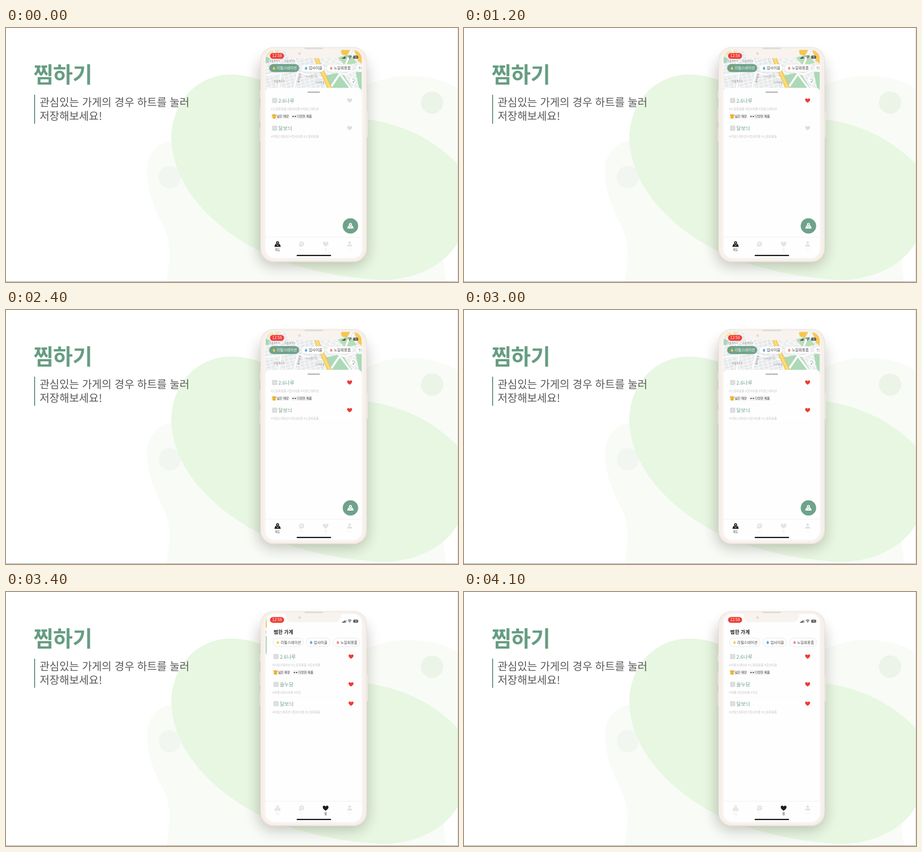
Animation, 853 px wide and 480 px high, one loop 4200 ms. Source, as an HTML page:

```html
<!DOCTYPE html>
<html lang="ko">
<head>
<meta charset="utf-8">
<title>찜하기</title>
<style>
html, body { margin: 0; width: 100%; height: 100%; overflow: hidden; background: #fff; }
svg { display: block; width: 853px; height: 480px; }
text { font-family: "Noto Sans CJK KR", "Noto Sans CJK", "Noto Sans", sans-serif; }
</style>
</head>
<body>
<svg id="stage" viewBox="0 0 853 480" xmlns="http://www.w3.org/2000/svg"></svg>
<script>
const GREEN = '#6fa28b', RED = '#f03b34', GRAY = '#dcdfdf';
const LOOP = 4200, PAGE_W = 182;
const LIKE_1 = 800, LIKE_2 = 1600, TAB = 3060, SLIDE = 3048, SLIDE_MS = 380, LIST = 3290;

const rect = (x, y, w, h, r, fill, more = '') =>
  `<rect x="${x}" y="${y}" width="${w}" height="${h}" rx="${r}" fill="${fill}" ${more}/>`;
const circle = (x, y, r, fill, more = '') =>
  `<circle cx="${x}" cy="${y}" r="${r}" fill="${fill}" ${more}/>`;
const path = (d, fill, more = '') => `<path d="${d}" fill="${fill}" ${more}/>`;
const line = (d, color, w, more = '') =>
  path(d, 'none', `stroke="${color}" stroke-width="${w}" ${more}`);
const text = (x, y, size, fill, s, weight = 400, more = '') =>
  `<text x="${x}" y="${y}" font-size="${size}" fill="${fill}" font-weight="${weight}" ${more}>${s}</text>`;
const at = (x, y, s, more = '') => `<g transform="translate(${x} ${y})" ${more}>${s}</g>`;

const HEART = 'M0 4.3C-2 2.5-4.7 .8-4.7-1.6C-4.7-4.4-1.4-4.9 0-2.5C1.4-4.9 4.7-4.4 4.7-1.6C4.7 .8 2 2.5 0 4.3Z';
const heart = (x, y, fill, id = '') => at(x, y, path(HEART, fill, id && `id="${id}"`));

const drop = (x, y, c) =>
  at(x, y, path('M0-3.1C1-1.6 2.2-.5 2.2 .9A2.2 2.2 0 0 1-2.2 .9C-2.2-.5-1-1.6 0-3.1Z', c) +
    circle(0, 1.1, .9, '#fff', 'opacity=".4"'));

const clover = (x, y) =>
  at(x, y, [[-2, -2], [2, -2], [-2, 2], [2, 2]].map(p => circle(...p, 3.1, '#dadddb')).join('') +
    line('M-3-3L3 3M3-3L-3 3', '#eceeed', .5));

function chip(x, y, w, h, label, color, on) {
  const off = h > 15 ? 14.2 : 13.7;
  return rect(x, y, w, h, h / 2, on ? GREEN : '#fff', `stroke="${on ? GREEN : '#dcdedd'}" stroke-width=".7"`) +
    drop(x + off - 5, y + h / 2, color) +
    text(x + off, y + h / 2 + 2.6, 6.95, on ? '#fff' : '#444', label);
}

const face = (x, y) => at(x, y,
  circle(0, .9, 3.5, '#f9c93d') +
  path('M-3.6-1L-4-4.2L-1.9-2.7L0-4.8L1.9-2.7L4-4.2L3.6-1Z', '#f2a52c') +
  circle(-1.2, .7, .5, '#6b4a1c') + circle(1.2, .7, .5, '#6b4a1c') +
  line('M-1.3 2.3Q0 3.3 1.3 2.3', '#6b4a1c', .5));
const eyes = (x, y) => [-2.1, 2.1].map(d =>
  `<ellipse cx="${x + d}" cy="${y}" rx="1.8" ry="2.2" fill="#fff" stroke="#ddd" stroke-width=".3"/>` +
  circle(x + d - .2, y + .2, 1.15, '#222')).join('');

const badges = y =>
  rect(500, y - 5.3, 35, 10.6, 3, '#f6f6f6') + face(506, y) + text(511, y + 2, 5.65, '#333', '넓은 매장') +
  rect(538, y - 5.3, 40.5, 10.6, 3, '#f6f6f6') + eyes(544, y) + text(549, y + 2, 5.75, '#333', '다양한 제품');

const shop = (y, name, tags, fill, id) =>
  clover(507, y) + text(514, y + 3.5, 9.4, GREEN, name, 500) +
  heart(648.5, y, fill, id) + text(500, y + 17.6, 5.65, '#c0c2c1', tags);

const pin = (fill, hole) =>
  path('M-6 5L-4.4-.2H-2.6Q-1.4 2 0 3.4Q1.4 2 2.6-.2H4.4L6 5Z', fill) +
  path('M0 2.3C-1.4 .7-2.9-.8-2.9-2.6A2.9 2.9 0 0 1 2.9-2.6C2.9-.8 1.4 .7 0 2.3Z', fill) +
  circle(0, -2.6, 1.1, hole);

function cityMap() {
  const label = (x, y, s, more) => text(x, y, 5, '#666', s, 400,
    `stroke="#fff" stroke-width="1" paint-order="stroke" ${more || ''}`);
  const road = d => line(d, '#d9dcdf', 4.2) + line(d, '#fff', 3.2);
  return `<g clip-path="url(#mapClip)">` +
    rect(490, 41, 182, 80, 0, '#e9ebed') +
    rect(490, 41, 182, 80, 0, 'url(#blocks)') +
    path('M583 41H672V121H614Z', '#eef0ee') +
    path('M583 41H672V121H614Z', 'url(#blocks2)') +
    path('M490 54L499 58L495 66L490 66Z', '#a9d7b4') +
    path('M490 41H516L513 47L490 52Z', '#f4e7b4') +
    path('M603 90L634 83L653 113H612Z', '#acd9b6') +
    path('M626 56L650 49L662 66L640 71Z', '#b6deb9') +
    path('M660 84L672 80V121H668Z', '#acd9b6') +
    path('M631 41H650L643 52L634 50Z', '#f7c64b') +
    path('M657 41H672V68L664 62Z', '#f7c95a') +
    road('M488 90L540 82L606 96') + road('M538 41L552 76L543 116') +
    road('M505 41L520 80L514 116') + road('M592 72L640 88L674 74') +
    road('M610 116L640 72L652 41') + road('M628 84L652 116') +
    line('M578 36L590 68L614 120', '#d3b056', 8) +
    line('M578 36L590 68L614 120', '#f9d566', 6.8) +
    line('M578 36L590 68L614 120', '#fff0b8', .7) +
    line('M566 36L579 70L600 120', '#c9ccd1', 1, 'stroke-dasharray="2 1"') +
    label(496, 63.5, '한솔동4가') + label(525, 63.5, '한솔동6가') + label(505, 101.5, '한솔동2가') +
    label(566, 93, '누리동7가') + label(583, 103.5, '누리마을') +
    label(0, 0, '솔바람로', 'transform="translate(553 104) rotate(-76)"') +
    `</g>`;
}

const background =
  path('M312 213C285 217 266 240 266 270C267 315 283 347 299 378C312 408 309 440 303 480H830C829 455 821 430 828 410L853 370V116C830 97 790 89 740 91C690 98 640 125 600 150Z', '#f8fbf6') +
  circle(309, 282, 21, '#f1f6f0') +
  path('M312 208C313 140 360 88 425 88C505 89 560 148 640 168C740 174 805 208 853 258V404C832 444 780 475 710 476C630 472 560 456 496 430C400 386 314 305 312 208Z', '#e7f7e1') +
  circle(804, 141, 21, '#ebf4e7') +
  rect(0, 479, 853, 1, 0, '#a2a2a2') + rect(852, 0, 1, 480, 0, '#dedede');

const title =
  text(52, 102.5, 40.5, '#669d82', '찜하기', 700, 'letter-spacing="-.4"') +
  rect(53, 126, 2, 55, 0, '#669d82') +
  text(63.5, 148.3, 20.2, '#595959', '관심있는 가게의 경우 하트를 눌러') +
  text(63.5, 173.6, 20.2, '#595959', '저장해보세요!');

const body =
  rect(476, 56, 206, 394, 28, '#5c5148', 'opacity=".32" filter="url(#soft)"') +
  [[118, 14], [150, 27], [188, 27]].map(b => rect(478.7, b[0], 3, b[1], 1, '#ece4de')).join('') +
  rect(679.5, 157, 3, 49, 1, '#f3eeea') +
  rect(480, 36, 201, 406.5, 25, '#eadfd7') +
  rect(481, 36.6, 199, 404.5, 24.5, '#f6efea') +
  rect(486, 39.5, 189, 398.5, 21, '#f8f3ef') +
  rect(490, 41.5, 181.5, 393, 17, '#fefefe');

const mapPage =
  cityMap() +
  chip(497, 68.5, 56, 14.5, '리필스테이션', '#f6c648', true) +
  chip(557.5, 68.5, 43.5, 14.5, '업사이클', '#4d9fe3') +
  chip(605, 68.5, 50, 14.5, '노일회용품', '#ee8478') +
  `<g clip-path="url(#mapClip)">` + rect(660, 68.5, 40, 14.5, 7.2, '#fff', 'stroke="#dcdedd" stroke-width=".7"') +
  line('M667 73V79M666 73V75H668V73M670 73V79', '#999', .7) + `</g>` +
  circle(655.5, 99, 6.6, '#fff', 'stroke="#e2e4e3" stroke-width=".5"') +
  line('M653 97.4A3 3 0 1 1 655.5 102', GREEN, .9) + path('M656.2 100.3V103.6L653.8 102Z', GREEN) +
  path('M490 398V121Q490 113 498 113H663.5Q671.5 113 671.5 121V398Z', '#fefefe') +
  rect(569, 120, 23.5, 2.4, 1.2, '#b5b5b5') +
  shop(137, '2.6나루', '#노일회용품 #업사이클 #리필스테이션', GRAY, 'like1') + badges(167) +
  rect(498, 177.5, 160, .5, 0, '#f6f6f6') +
  shop(189.3, '달보늬', '#리필스테이션 #업사이클 #노일회용품', GRAY, 'like2') +
  rect(498, 213, 160, .5, 0, '#f6f6f6') +
  circle(650, 374, 14.6, GREEN) + at(650, 374, pin('#fff', GREEN), '');

const likedPage =
  text(502.3, 79, 9.35, '#222', '찜한 가게', 700) +
  chip(501.3, 87.2, 57.5, 15.8, '리필스테이션', '#f6c648') +
  chip(564, 87.2, 45, 15.8, '업사이클', '#4d9fe3') +
  chip(614.5, 87.2, 50.5, 15.8, '노일회용품', '#ea7f86') +
  `<g id="list">` +
  shop(122, '2.6나루', '#리필스테이션 #노일회용품 #업사이클', RED) + badges(152) +
  rect(498, 162.5, 160, .5, 0, '#f7f7f7') +
  shop(174.5, '솔누담', '#카페 #업사이클 #식당', RED) +
  rect(498, 198.5, 160, .5, 0, '#f7f7f7') +
  shop(211, '달보늬', '#리필스테이션 #업사이클 #노일회용품', RED) + `</g>`;

const tabLabel = (x, s) => text(x, 421, 5.2, 'currentColor', s, 400, 'text-anchor="middle"');
const nav =
  rect(490, 395.5, 182, 40, 0, '#fefefe') + rect(490, 395.3, 182, .7, 0, '#ededed') +
  `<g id="tabMap">` + at(512.5, 408.5, pin('currentColor', '#fff')) + tabLabel(512.5, '지도') + `</g>` +
  `<g color="#e3e4e4">` +
  circle(558, 408, 4.8, 'currentColor') + path('M553.2 408V413H558Z', 'currentColor') +
  line('M556.5 410.5V406H558.5A1.4 1.4 0 0 1 558.5 409H556.5', '#fff', .8) +
  circle(648.5, 405.6, 2.5, 'currentColor') + path('M643.5 413Q643.5 408.8 648.5 408.8T653.5 413Z', 'currentColor') +
  `<g color="#eff0f0">` + tabLabel(558, '피드') + tabLabel(648.5, 'MY') + `</g></g>` +
  `<g id="tabLike">` + at(603.2, 408.5, path(HEART, 'currentColor', 'transform="scale(1.15)"')) + tabLabel(603.2, '찜') + `</g>` +
  rect(548.5, 428.7, 65, 2.4, 1.2, '#111');

const status =
  path('M524 40Q528 41.5 528 45Q529 57 540 57H620Q631 57 632 45Q632 41.5 636 40Z', '#f8f3ef') +
  rect(563.5, 37.3, 34.5, 2.8, 1.4, '#dedad7') + circle(554, 48.3, 2.5, '#e3dcd5') +
  rect(498.3, 47.2, 26.5, 11, 5.5, RED) +
  text(511.6, 55.3, 7.3, '#fff', '12:58', 500, 'text-anchor="middle"') +
  [0, 1, 2, 3].map(i => rect(634.2 + i * 2.2, 56.6 - i * 1.3, 1.6, 1.5 + i * 1.3, .4, i < 3 ? '#222' : '#aaa')).join('') +
  line('M645.3 53.9Q648.6 51 651.9 53.9M646.6 55.6Q648.6 53.8 650.6 55.6', '#222', 1.1) + circle(648.6, 57.2, .8, '#222') +
  rect(655.3, 52.2, 9, 5.8, 1.6, '#555') + rect(664.7, 54.2, .8, 1.8, .4, '#777') +
  text(659.8, 56.7, 4.2, '#fff', '30', 500, 'text-anchor="middle"');

const defs = `<defs>
<filter id="soft" x="-30%" y="-20%" width="160%" height="140%"><feGaussianBlur stdDeviation="13"/></filter>
<clipPath id="screen">${rect(490, 41.5, 181.5, 393, 17, '#000')}</clipPath>
<clipPath id="mapClip">${rect(490, 41, 181.5, 80, 0, '#000')}</clipPath>
<pattern id="blocks" width="9" height="6" patternUnits="userSpaceOnUse" patternTransform="rotate(-14)">${line('M0 0H9M0 0V6', '#fff', 1.6)}${line('M3 3H7', '#d5d8dc', .6)}</pattern>
<pattern id="blocks2" width="10" height="7" patternUnits="userSpaceOnUse" patternTransform="rotate(28)">${line('M0 0H10M0 0V7', '#fff', 1.6)}${line('M3 3.5H7', '#d9dcdd', .6)}</pattern>
</defs>`;

document.getElementById('stage').innerHTML = defs + background + title + body +
  `<g clip-path="url(#screen)"><g id="pageMap">${mapPage}</g><g id="pageLiked">${likedPage}</g>${nav}</g>` + status;

const el = id => document.getElementById(id);
const [like1, like2, pageMap, pageLiked, list, tabMap, tabLike] =
  ['like1', 'like2', 'pageMap', 'pageLiked', 'list', 'tabMap', 'tabLike'].map(el);

function draw(t) {
  const u = Math.min(1, Math.max(0, (t - SLIDE) / SLIDE_MS));
  const x = -PAGE_W * u * u * (3 - 2 * u);
  like1.setAttribute('fill', t < LIKE_1 ? GRAY : RED);
  like2.setAttribute('fill', t < LIKE_2 ? GRAY : RED);
  pageMap.setAttribute('transform', `translate(${x} 0)`);
  pageLiked.setAttribute('transform', `translate(${x + PAGE_W} 0)`);
  list.setAttribute('visibility', t < LIST ? 'hidden' : 'visible');
  tabMap.setAttribute('color', t < TAB ? '#1c1c1c' : '#e3e4e4');
  tabLike.setAttribute('color', t < TAB ? '#e3e4e4' : '#1c1c1c');
}

const start = performance.now();
function tick(now) {
  draw(Math.max(0, now - start) % LOOP);
  requestAnimationFrame(tick);
}
draw(0);
requestAnimationFrame(tick);
</script>
</body>
</html>
```
